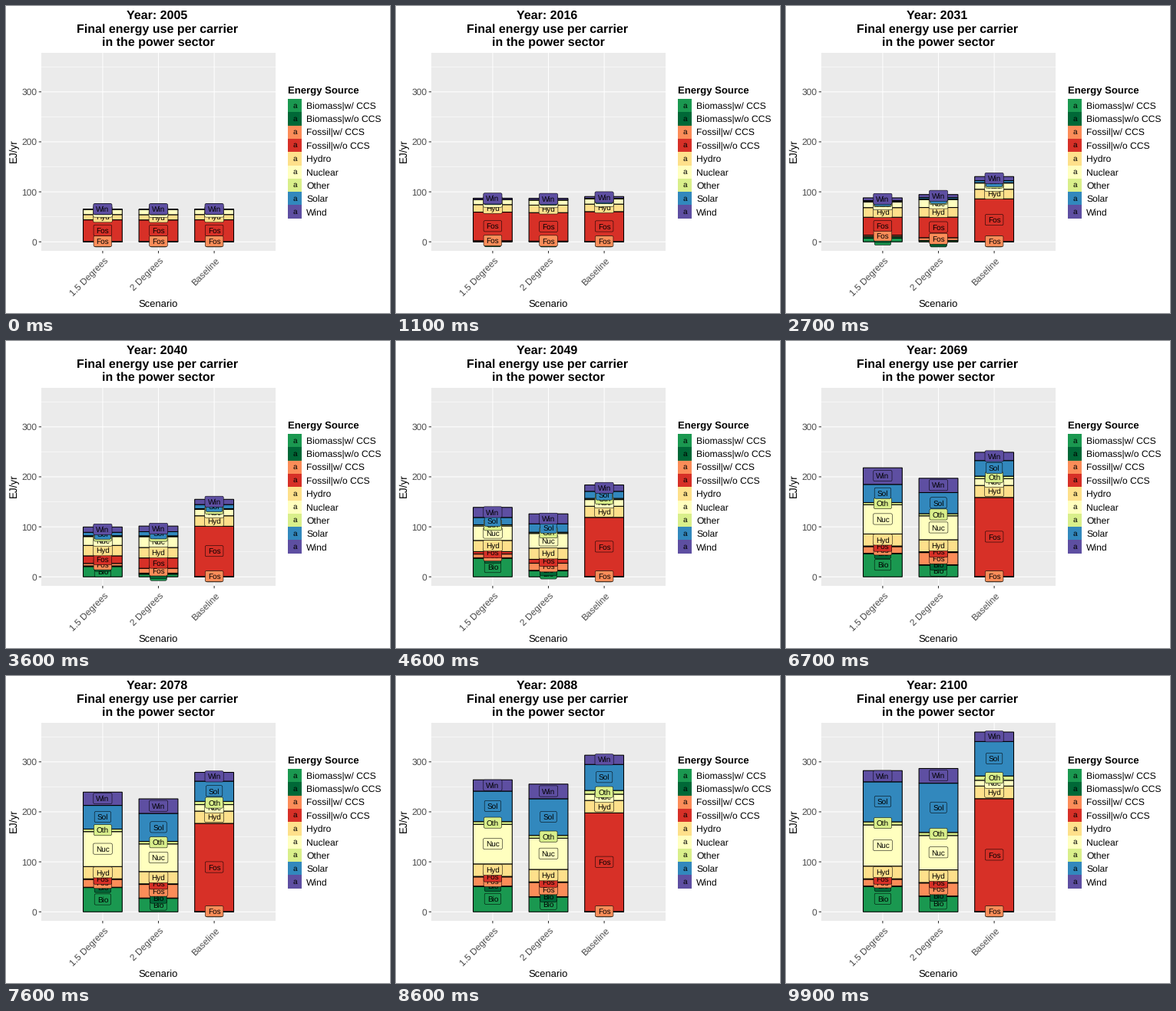
These frames come from a looping animation (500 px wide and 400 px high, 10000 ms). A matplotlib script:

```python
import numpy as np
import matplotlib.pyplot as plt
from matplotlib.animation import FuncAnimation
from matplotlib.patches import FancyBboxPatch, Rectangle

W, H = 500, 400
FRAMES, INTERVAL = 100, 100
FIRST, LAST = 2005, 2100
PT = 0.72  # points per pixel at 100 dpi

LEFT, RIGHT, TOP, BOTTOM = 46, 351, 61, 319
ZERO, UNIT = 307.27, 0.6515  # pixel row of 0 EJ/yr, pixels per EJ/yr
BAR_X = [125.9, 198.5, 271.1]
BAR_W = 50.8
LABEL_H = 14.2

SOURCES = {
    "Biomass|w/ CCS": "#1A9850",
    "Biomass|w/o CCS": "#006837",
    "Fossil|w/ CCS": "#FC8D59",
    "Fossil|w/o CCS": "#D73027",
    "Hydro": "#FEE08B",
    "Nuclear": "#FFFFBF",
    "Other": "#D9EF8B",
    "Solar": "#3288BD",
    "Wind": "#5E4FA2",
}


def energy(year):
    """Energy use (EJ/yr) per scenario, in the order of SOURCES."""
    age = year - FIRST

    def ramp(a, b):
        return np.clip((year - a) / (b - a), 0, 1)

    def ease(a, b):
        s = ramp(a, b)
        return s * s * (3 - 2 * s)

    def rise(a, b):
        return np.sin(np.pi / 2 * ramp(a, b))

    def switch(mid, width):
        return 1 / (1 + np.exp((mid - year) / width))

    def bell(mid, width):
        return np.exp(-((year - mid) / width) ** 2)

    def phase_out(mid, width):
        return 1 + (43.4 + 2 * age) * (1 - switch(mid, width))

    hydro = 10.5 + 15.5 * (1 - np.exp(-age / 31))
    other = 0.2 + 6 * ease(2010, 2105)
    return {
        "1.5 Degrees": [
            47 * switch(2041, 6) + 4 * ramp(2070, 2088),
            0.5 + 3.3 * bell(2027, 10),
            0.1 + 18.5 * ramp(2022, 2088) - 5 * ramp(2088, 2100),
            phase_out(2027.5, 6.2),
            hydro,
            10 + 72.5 * ease(2025, 2097),
            other,
            80 * ramp(2025, 2100) ** 1.5,
            0.4 + 4 * ramp(2005, 2025) + 18 * switch(2042, 4) + 11 * bell(2068, 10),
        ],
        "2 Degrees": [
            31 * rise(2032, 2100),
            0.6 + 2.2 * bell(2030, 14),
            0.1 + 25.5 * ramp(2020, 2072) + 3 * bell(2086, 10),
            phase_out(2028.7, 7),
            hydro,
            10 + 60.5 * ease(2012, 2110),
            other,
            98.5 * ramp(2020, 2100) ** 1.75,
            0.4 + 2.5 * ramp(2005, 2016) + 26.5 * switch(2045, 7),
        ],
        "Baseline": [
            0.2,
            0.2,
            0.3,
            43.4 + 1.5 * age + 0.0044 * age ** 2,
            hydro,
            10 + 3.5 * np.sin(np.pi * age / 110),
            0.2 + 8.7 * ease(2020, 2110),
            69 * ramp(2010, 2100) ** 1.9,
            0.4 + 18.5 * rise(2005, 2100),
        ],
    }


def row(value):
    return ZERO - UNIT * value


plt.rcParams["font.family"] = "Liberation Sans"
plt.rcParams["text.hinting"] = "none"
fig = plt.figure(figsize=(W / 100, H / 100), dpi=100, facecolor="white")
ax = fig.add_axes([0, 0, 1, 1])
ax.set(xlim=(0, W), ylim=(H, 0))
ax.axis("off")


def text(x, y, s, size, **kw):
    return ax.text(x, y, s, fontsize=size * PT, va="baseline",
                   rotation_mode="anchor", **kw)


def line(xs, ys, color, width):
    ax.plot(xs, ys, color=color, lw=width * PT, zorder=1,
            solid_capstyle="butt", snap=False)


def box(x, y, w, h, color, **kw):
    return ax.add_patch(Rectangle((x, y), w, h, facecolor=color, **kw))


# Panel, grid and axes
box(LEFT, TOP, RIGHT - LEFT, BOTTOM - TOP, "#EBEBEB", lw=0, zorder=0)
for v in range(50, 351, 100):
    line([LEFT, RIGHT], [row(v)] * 2, "white", 0.53)
for v in range(0, 301, 100):
    line([LEFT, RIGHT], [row(v)] * 2, "white", 1.07)
    line([LEFT - 3.25, LEFT], [row(v)] * 2, "#333333", 1.07)
    text(40.2, row(v) + 4.3, str(v), 12, ha="right", color="#4D4D4D")
for x, name in zip(BAR_X, energy(FIRST)):
    line([x, x], [TOP, BOTTOM], "white", 1.07)
    line([x, x], [BOTTOM, BOTTOM + 3.25], "#333333", 1.07)
    text(x + 7.2, 331.9, name, 12, ha="right", rotation=45, color="#4D4D4D")
text(198.5, 392, "Scenario", 13, ha="center")
text(13.5, 189, "EJ/yr", 13.5, ha="center", rotation=90)

# Titles
title = text(197, 17, "", 16, ha="center", weight="bold")
text(197.4, 34.7, "Final energy use per carrier", 16, ha="center", weight="bold")
text(198.5, 52, "in the power sector", 16, ha="center", weight="bold")

# Legend
text(367, 113, "Energy Source", 13.1, weight="bold")
KEY = 17.28
for k, (name, color) in enumerate(SOURCES.items()):
    y = 121.2 + k * KEY
    box(367, y, 18, KEY, color, lw=0)
    text(376, y + KEY / 2 + 2.7, "a", 10, ha="center")
    text(391, y + KEY / 2 + 4.3, name, 12.1)

# Bars and their labels
bars, labels = [], []
for x in BAR_X:
    for k, (name, color) in enumerate(SOURCES.items()):
        bars.append(box(x - BAR_W / 2, ZERO, BAR_W, 0, color, ec="black",
                        lw=1.07 * PT, joinstyle="miter", snap=False, zorder=4))
        word = text(x, ZERO, name[:3], 10, ha="center", zorder=5.5 + k)
        w = word.get_window_extent().width + 7
        tag = FancyBboxPatch((x - w / 2, ZERO), w, LABEL_H,
                             boxstyle="round,pad=0,rounding_size=1.8",
                             fc=color, ec="black", lw=0.53 * PT,
                             snap=False, zorder=5 + k)
        labels.append((ax.add_patch(tag), word))


def draw(i):
    year = FIRST + (LAST - FIRST) * i / (FRAMES - 1)
    title.set_text(f"Year: {round(year)}")
    shapes = zip(bars, labels)
    for parts in energy(year).values():
        low = ZERO
        for part in parts:
            bar, (tag, word) = next(shapes)
            high = low - UNIT * part
            bar.set_y(high)
            bar.set_height(low - high)
            mid = (low + high) / 2 - 0.4
            tag.set_y(mid - LABEL_H / 2)
            word.set_y(mid + 3.6)
            low = high
    return [title, *bars]


anim = FuncAnimation(fig, draw, frames=FRAMES, interval=INTERVAL, repeat=True)
plt.show()
```
